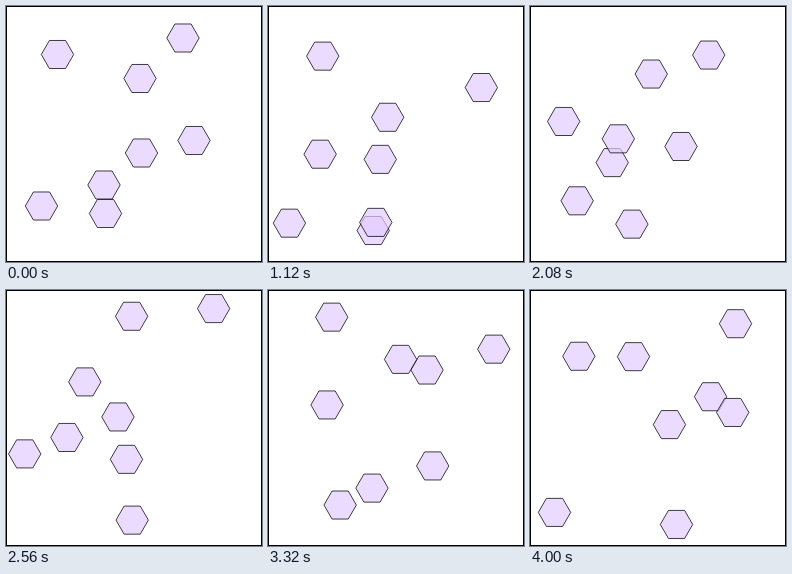
These frames come from a looping animation (256x256 px, 4.02 s). An HTML page with a canvas:

```html
<!DOCTYPE html>
<html lang="en">
<head>
<meta charset="utf-8">
<title>Bouncing hexagons</title>
<style>
  html, body { margin: 0; width: 100%; height: 100%; overflow: hidden; background: #fff; }
  canvas { display: block; width: 256px; height: 256px; }
</style>
</head>
<body>
<canvas id="stage" width="256" height="256"></canvas>
<script>
const ctx = document.getElementById('stage').getContext('2d');
const SIZE = 256, LOOP = 4020, TICK = 20, R = 16.2;
const PAD_X = 16.4, PAD_Y = 14.75;

// Start x, y and heading in degrees, back to front; all share one speed
const hexes = [
  [134, 72.5, -130.4],
  [177, 32, -43.4],
  [35.5, 200, -46.5],
  [51.5, 48.5, 125.4],
  [188, 134.5, 132.6],
  [98, 179, 135.1],
  [135.5, 147, 103.1],
  [99.5, 207.5, 84]
];

// Distance covered, in px, at a few times in ms: brisk, slower, brisk again
const pace = [[0, 0], [540, 62.1], [1120, 122.3], [2080, 208.1], [3640, 344.6], [4000, 382.2]];

function distanceAt(t) {
  const i = pace.findIndex(([time]) => time >= t);
  if (i < 1) return pace[0][1];
  const [t0, d0] = pace[i - 1], [t1, d1] = pace[i];
  return d0 + (d1 - d0) * (t - t0) / (t1 - t0);
}

// Reflect a straight path between the two walls
function bounce(p, pad) {
  const span = SIZE - 2 * pad, lap = 2 * span;
  const q = ((p - pad) % lap + lap) % lap;
  return pad + Math.min(q, lap - q);
}

function drawHex(x, y) {
  ctx.beginPath();
  for (let i = 0; i < 6; i++) {
    const a = i * Math.PI / 3;
    ctx.lineTo(x + R * Math.cos(a), y + R * Math.sin(a));
  }
  ctx.closePath();
  ctx.fill();
  ctx.stroke();
}

function draw(t) {
  const d = distanceAt(t);
  ctx.fillStyle = '#fff';
  ctx.fillRect(0, 0, SIZE, SIZE);
  ctx.lineWidth = 1;
  ctx.strokeStyle = '#000';
  ctx.strokeRect(0.5, 0.5, SIZE - 1, SIZE - 1);
  ctx.fillStyle = 'rgba(227, 204, 255, 0.7)';
  ctx.strokeStyle = 'rgba(0, 0, 0, 0.75)';
  for (const [x, y, deg] of hexes) {
    const a = deg * Math.PI / 180;
    drawHex(bounce(x + d * Math.cos(a), PAD_X), bounce(y + d * Math.sin(a), PAD_Y));
  }
}

const start = performance.now();
function frame() {
  const t = (performance.now() - start) % LOOP;
  draw(Math.floor(t / TICK) * TICK);
  requestAnimationFrame(frame);
}
frame();
</script>
</body>
</html>
```
